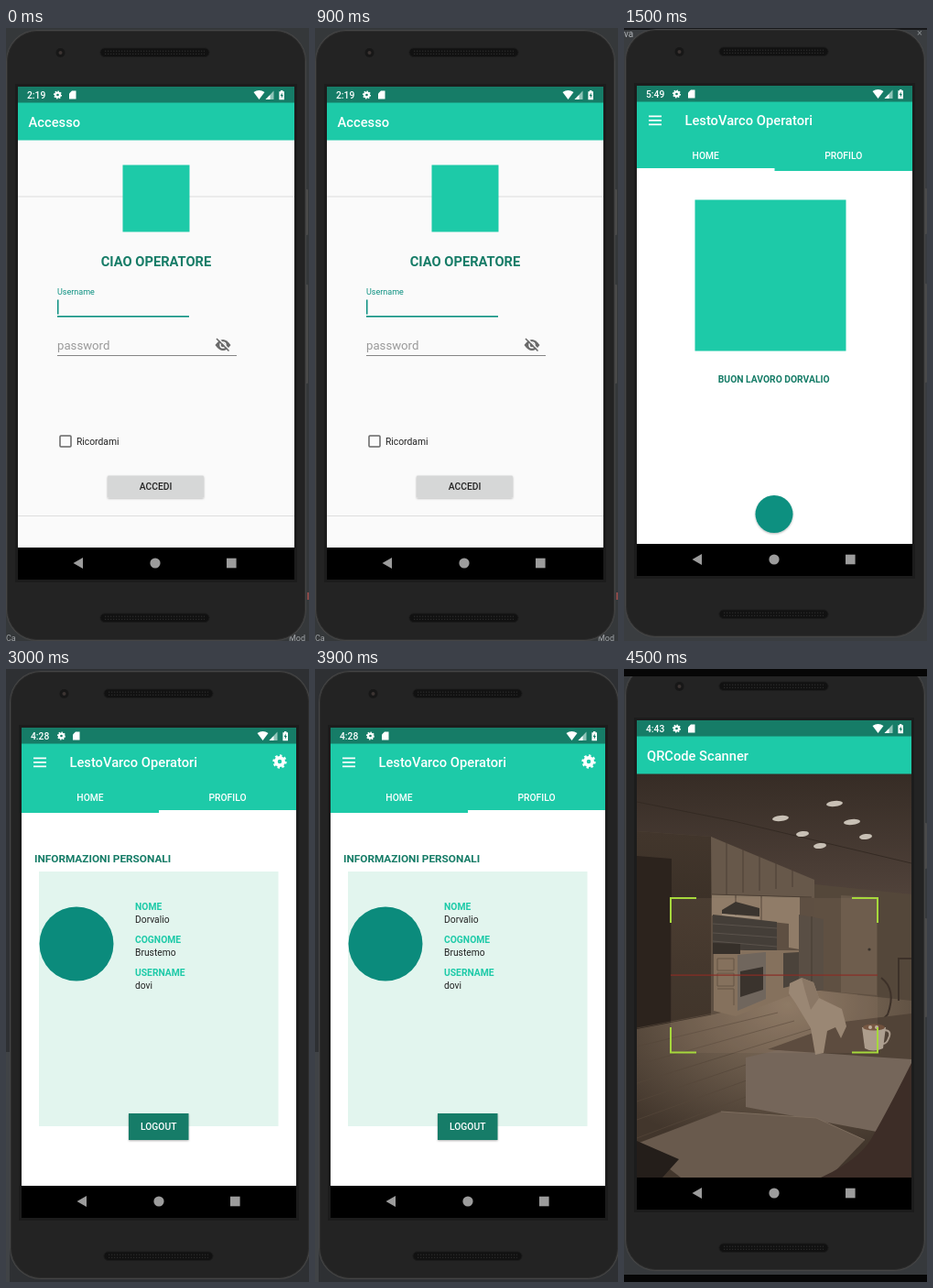
Write an HTML page that moves like this. It is 331 by 669 pixels and loops after 6 s.

```html
<!DOCTYPE html>
<html lang="it">
<head>
<meta charset="utf-8">
<title>App operatori</title>
<style>
  html, body { margin: 0; width: 100%; height: 100%; overflow: hidden; background: #2b2b2b; }
  svg { display: block; width: 100vw; height: 100vh; font-family: Roboto, sans-serif; }
</style>
</head>
<body>
<svg id="stage" viewBox="0 0 331 669" preserveAspectRatio="none">
  <defs>
    <linearGradient id="ceiling" x2="0" y2="1">
      <stop stop-color="#362c25"/><stop offset="1" stop-color="#50423a"/>
    </linearGradient>
    <linearGradient id="wall" x2="0" y2="1">
      <stop stop-color="#42362c"/><stop offset="1" stop-color="#30271f"/>
    </linearGradient>
    <radialGradient id="floor" cx=".55" cy=".08" r=".8">
      <stop stop-color="#8a7763"/><stop offset="1" stop-color="#42362c"/>
    </radialGradient>
    <filter id="shadow" x="-30%" y="-30%" width="160%" height="180%">
      <feDropShadow dx="0" dy="1" stdDeviation="1.2" flood-opacity=".3"/>
    </filter>
  </defs>
</svg>
<script>
const DARK = '#167c67', MINT = '#1dcaa8', TEAL = '#0b9080';
const BODY = 10.3, TITLE = 14.7;

const rect = (x, y, w, h, fill, more = '') =>
  `<rect x="${x}" y="${y}" width="${w}" height="${h}" fill="${fill}" ${more}/>`;
const circle = (x, y, r, fill, more = '') =>
  `<circle cx="${x}" cy="${y}" r="${r}" fill="${fill}" ${more}/>`;
const shape = (d, fill) => `<path d="${d}" fill="${fill}"/>`;
const line = (d, color, width = 1, more = '') =>
  `<path d="${d}" fill="none" stroke="${color}" stroke-width="${width}" ${more}/>`;
const text = (x, y, s, size, fill, weight = 400, more = '') =>
  `<text x="${x}" y="${y}" font-size="${size}" fill="${fill}" font-weight="${weight}" ${more}>${s}</text>`;
const centered = (x, y, s, size, fill, weight) =>
  text(x, y, s, size, fill, weight, 'text-anchor="middle"');

const gear = (x, y, r) =>
  circle(x, y, r * .55, 'none', `stroke="#fff" stroke-width="${r * .5}"`) +
  circle(x, y, r * .85, 'none',
    `stroke="#fff" stroke-width="${r * .34}" pathLength="16" stroke-dasharray="1"`);

function statusBar(x, y, w, time) {
  return rect(x, y, w, 17.5, DARK) +
    text(x + 10, y + 12.5, time, BODY, '#fff', 500) +
    gear(x + 43.5, y + 9, 4.5) +
    shape(`M${x + 59} ${y + 4.5}h4.5v9h-7.5v-6z`, '#fff') +
    shape(`M${x + 257.5} ${y + 6}q6-4 12 0l-6 8z`, '#fff') +
    shape(`M${x + 279.5} ${y + 4.5}v9.5h-9z`, '#8fc4b8') +
    shape(`M${x + 275.5} ${y + 9}v5h-5z`, '#fff') +
    shape(`M${x + 287} ${y + 4}h2.4v1.2h1.6v9h-5.6v-9h1.6z`, '#fff') +
    shape(`M${x + 288.7} ${y + 6.5}l-2 3.6h1.2v2.6l2-3.6h-1.2z`, DARK);
}

function navBar(x, y, w) {
  const m = y + 17;
  return rect(x, y, w, 35, '#000') +
    shape(`M${x + 60.5} ${m}l10.5-6v12z`, '#9c9c9c') +
    circle(x + 150, m, 5.6, '#9c9c9c') +
    rect(x + 228, m - 5.3, 10.6, 10.6, '#9c9c9c');
}

// Phone whose display has its top left corner at x, y
function phone(x, y, w, h, time, back, content) {
  const grill = gy => rect(x + 90, gy, 119, 9.5, '#111', 'rx="4.7" stroke="#1b1b1b"') +
    line(`M${x + 95} ${gy + 3.2}h109M${x + 95} ${gy + 6.3}h109`, '#303030', 1, 'stroke-dasharray="1.3 1.7"');
  const bottom = y + h;
  return rect(x + 313, y + 112, 4, 50, '#4a4a4a', 'rx="1"') +
    rect(x + 313, y + 216, 4, 108, '#4a4a4a', 'rx="1"') +
    rect(x - 13, y - 62, 328, h + 129, '#454545', 'rx="34"') +
    rect(x - 11.5, y - 60.5, 325, h + 126, '#232323', 'rx="32.5" stroke="#2e2e2e"') +
    rect(x - 3, y - 3, w + 6, h + 6, '#1c1c1c') +
    circle(x + 46.5, y - 37, 5, '#171717') + circle(x + 46.5, y - 37, 2, '#3c3432') +
    grill(y - 42) + grill(bottom + 37) +
    rect(x, y, w, h, back) + content +
    statusBar(x, y, w, time) + navBar(x, bottom - 35, w);
}

const logo = (x, y, size) => rect(x - size / 2, y - size / 2, size, size, MINT);

function appBar(x, y, w, active) {
  const half = w / 2;
  return rect(x, y, w, 76, MINT) +
    [15.5, 20, 24.5].map(d => rect(x + 13, y + d, 14, 1.7, '#fff')).join('') +
    text(x + 52.5, y + 26, 'LestoVarco Operatori', TITLE, '#fff', 500) +
    centered(x + half / 2, y + 62.5, 'HOME', BODY, '#fff', 500) +
    centered(x + half * 1.5, y + 62.5, 'PROFILO', BODY, '#fff', 500) +
    rect(x + half * active, y + 73, half, 3, '#fff');
}

const eyeOff =
  shape('M228.5 346q8.5-12 17 0q-8.5 12-17 0z', '#6a6a6a') +
  circle(237, 346, 3, '#6a6a6a', 'stroke="#fafafa" stroke-width="1.4"') +
  line('M231.2 338.2l13 13', '#fafafa', 1.6) +
  line('M230 339l13.5 13.5', '#6a6a6a', 1.6);

function login() {
  return rect(0, 0, 331, 669, '#35383a') +
    text(0, 669, 'Ca', 9, '#a0a4a8') + text(309, 669, 'Mod', 9, '#a0a4a8') +
    rect(329, 616, 2, 8, '#8a4a48') +
    phone(13, 64, 302, 538, '2:19', '#fafafa',
      rect(13, 81, 302, 41.5, MINT) +
      text(24.5, 107.5, 'Accesso', TITLE, '#fff', 500) +
      rect(13, 183.5, 302, 1, '#dedede') + rect(13, 532, 302, 1, '#dedede') +
      logo(164, 186, 73) +
      centered(164, 260, 'CIAO OPERATORE', TITLE, DARK, 700) +
      text(56, 291, 'Username', 9, TEAL) +
      rect(56, 296.5, 1.5, 16, TEAL) + rect(56, 314, 144, 1.6, TEAL) +
      text(56, 350.5, 'password', 13.2, '#999') +
      eyeOff + rect(56, 357, 196, 1, '#858585') +
      rect(59, 445, 12, 12, 'none', 'rx="1" stroke="#666" stroke-width="1.5"') +
      text(77, 455, 'Ricordami', BODY, '#222') +
      rect(111, 488.5, 105, 24, '#d6d7d7', 'rx="1" filter="url(#shadow)"') +
      centered(163.7, 504, 'ACCEDI', BODY, '#222', 500));
}

function home() {
  return rect(0, 0, 331, 669, '#3a3d40') + rect(0, 0, 331, 2, '#17181a') +
    text(0, 10, 'va', 10, '#b0b4b8') +
    phone(14, 63, 301, 535, '5:49', '#fff',
      appBar(14, 80, 301, 0) +
      logo(160, 270, 165) +
      centered(163.7, 387, 'BUON LAVORO DORVALIO', BODY, DARK, 700) +
      circle(164, 530.5, 20.5, TEAL, 'filter="url(#shadow)"')) +
    text(320, 9, '×', 11, '#85898c');
}

function profile() {
  const field = (y, label, value) =>
    text(141, y, label, BODY, MINT, 700) + text(141, y + 14.3, value, BODY, '#222');
  return rect(0, 0, 331, 669, '#2e3033') + rect(0, 418, 4, 251, '#404346') +
    phone(17, 64, 300, 535, '4:28', '#fff',
      appBar(17, 81, 300, 1) + gear(299, 101, 7.5) +
      text(31, 211, 'INFORMAZIONI PERSONALI', 11.8, DARK, 700) +
      rect(36, 221, 261.5, 278, '#e2f5ee') +
      circle(77, 300, 40.5, '#0b8b7c') +
      field(263, 'NOME', 'Dorvalio') +
      field(299, 'COGNOME', 'Brustemo') +
      field(334.5, 'USERNAME', 'dovi') +
      rect(134, 485, 65.5, 29, DARK, 'filter="url(#shadow)"') +
      centered(166.7, 503, 'LOGOUT', BODY, '#fff', 500));
}

function room() {
  const lamps = [[230, 147], [171, 163], [249, 167], [195, 180], [264, 183], [214, 193]]
    .map(([x, y]) => `<ellipse cx="${x}" cy="${y}" rx="${y < 170 ? 9 : 7}" ry="3" fill="#c8c0b5" transform="rotate(-6 ${x} ${y})"/>`).join('');
  let planks = '';
  for (let i = 0; i < 7; i++) planks += `M14 ${392 + i * 20}L${150 + i * 18} ${366 + i * 9}`;
  let doors = '';
  for (let i = 0; i < 5; i++) doors += `M${112 + i * 18} ${190 + i * 6.5}V${246 - i * 2}`;
  return rect(14, 114, 300, 441, '#53463a') +
    shape('M14 114H314V246L205 235L95 183L14 177z', 'url(#ceiling)') +
    line('M14 145L120 166L314 212', '#342a23') +
    shape('M14 177L95 183V379L14 394z', 'url(#wall)') +
    shape('M14 204L52 207V386L14 393z', '#2c231d') +
    shape('M208 235L314 246V362H208z', '#54473a') +
    shape('M237 247L276 249V356L237 353z', '#655647') + circle(268, 306, 1.6, '#292521') +
    shape('M14 393L98 377L205 350L314 362V555H14z', 'url(#floor)') +
    line(planks, '#55473a', .7) +
    shape('M95 183L208 230V250L96 246z', '#67584a') +
    shape('M96 246L192 249V306L180 304V278L96 269z', '#8c7a66') +
    line(doors + 'M96 246L205 249M122 247V270M150 248V274', '#4c3f34') +
    shape('M97 268L167 276V311L97 303z', '#35322f') +
    line('M97 278l70 5M97 288l70 5M97 297l70 6', '#59554f', .7) +
    shape('M122 254L148 261V270L107 267V263z', '#2b2825') + line('M107 268L148 272', '#a49684', 1.5) +
    shape('M98 307L192 307V352L122 379L98 373z', '#7f6d59') +
    line('M102 316h18v13h-18zM102 332h18v14h-18zM102 349h18v18', '#5b4c3e') +
    shape('M97 299L127 300V311H97z', '#25221f') +
    shape('M124 312L155 309V360L124 373z', '#67605a') +
    shape('M127 330L152 325V350L127 358z', '#292622') +
    shape('M174 310L191 309V344L174 348z', '#3d3832') +
    shape('M191 268L218 273V350L191 355z', '#4d453d') + line('M205 270V352', '#393029') +
    lamps +
    line('M300 362V316H314M281 337Q298 350 288 377L276 390', '#3d3129', 2) +
    shape('M157 415L240 385L314 376V438L277 428z', '#514337') +
    shape('M133 424L168 416L314 426V487L276 505L133 478z', '#75665a') +
    shape('M14 518L106 483L210 490L263 514L224 555H62z', '#695a4d') +
    line('M106 483L210 490L263 514', '#7d6d5e') +
    shape('M14 515L60 535L42 555H14z', '#241e1a') +
    shape('M215 555Q256 536 270 513Q289 480 314 430V555z', '#3d2d27') +
    shape('M181 343L194 337L207 342L213 359L238 371L243 390L237 403L231 391L222 395L218 419L209 421L204 392L187 364L180 354z', '#988674') +
    shape('M194 337L207 342L213 359L204 372L198 352z', '#857463') +
    line('M285 394q8 1 4 9q-2 6-6 6', '#a99a8b', 2) +
    shape('M260 391H286L283 414Q272 419 263 414z', '#ad9f90') +
    `<ellipse cx="273" cy="391" rx="12" ry="3.6" fill="#70503c"/>` +
    circle(269, 391, 2, '#c3b3a3') + circle(276, 391, 2, '#c3b3a3');
}

function scanner() {
  return rect(0, 0, 331, 669, '#36393c') +
    phone(14, 56, 300, 534, '4:43', '#000',
      room() +
      rect(14, 73, 300, 41.5, MINT) +
      text(25, 99.5, 'QRCode Scanner', TITLE, '#fff', 500) +
      rect(51, 250, 226, 169, '#a98a72', 'opacity=".13"') +
      rect(51, 333.5, 226, 1.2, '#8a2d25') +
      line('M51 277V250H79M249 250H277V277M277 391V418.5H249M79 418.5H51V391', '#a6d83c', 2)) +
    rect(0, 0, 331, 8, '#060606') + rect(0, 661, 331, 8, '#060606');
}

const stage = document.getElementById('stage');
const screens = [login, home, profile, scanner].map(draw => {
  const g = document.createElementNS('http://www.w3.org/2000/svg', 'g');
  g.innerHTML = draw();
  return stage.appendChild(g);
});

function tick() {
  const current = Math.floor(performance.now() % 6000 / 1500);
  screens.forEach((g, i) => g.setAttribute('display', i === current ? 'inline' : 'none'));
  requestAnimationFrame(tick);
}
tick();
</script>
</body>
</html>
```
